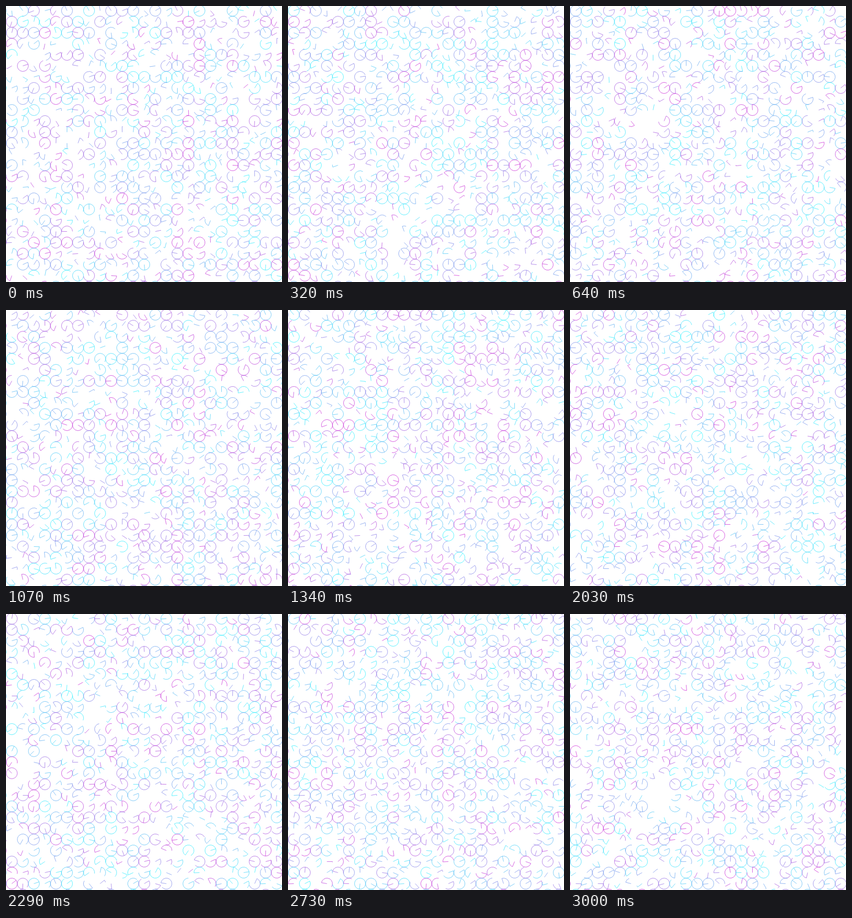
An HTML page with a canvas that plays this animation: 500x500 px, repeating every 3.1 s.

```html
<!DOCTYPE html>
<html lang="en">
<head>
<meta charset="utf-8">
<title>Random arcs</title>
<style>
html, body { margin: 0; width: 100%; height: 100%; overflow: hidden; background: #fff; }
canvas { display: block; width: 500px; height: 500px; }
</style>
</head>
<body>
<canvas id="stage" width="500" height="500"></canvas>
<script>
const ctx = document.getElementById('stage').getContext('2d');
const LOOP = 3100, CELL = 20, RADIUS = 10, TAU = Math.PI * 2;
const CYAN = [0, 240, 255], MAGENTA = [196, 0, 206];

// Runs of evenly spaced redraws: first time, last time, count
const RUNS = [
  [60, 550, 7], [640, 1160, 7], [1250, 1770, 7],
  [1850, 2290, 6], [2380, 2820, 6], [2910, 3000, 2]
];
const times = [0];
for (const [from, to, count] of RUNS) {
  for (let i = 0; i < count; i++) {
    times.push(Math.round((from + (to - from) * i / (count - 1)) / 10) * 10);
  }
}

function seeded(seed) {
  let s = seed | 0;
  return () => {
    s = (s + 0x6D2B79F5) | 0;
    let t = Math.imul(s ^ (s >>> 15), 1 | s);
    t = (t + Math.imul(t ^ (t >>> 7), 61 | t)) ^ t;
    return ((t ^ (t >>> 14)) >>> 0) / 4294967296;
  };
}

function mix(t) {
  const rgb = CYAN.map((c, i) => Math.round(c + (MAGENTA[i] - c) * t));
  return `rgb(${rgb})`;
}

// One spoke from the centre, then a clockwise arc
function drawArc(x, y, start, sweep, color) {
  ctx.strokeStyle = color;
  ctx.beginPath();
  ctx.moveTo(x, y);
  ctx.arc(x, y, RADIUS, start, start + sweep);
  ctx.stroke();
}

function drawField(step) {
  const rand = seeded(step * 7919 + 101);
  ctx.fillStyle = '#fff';
  ctx.fillRect(0, 0, 500, 500);
  ctx.lineWidth = 0.6;
  for (let col = -1; col <= 24; col++) {
    for (let row = 0; row <= 25; row++) {
      const kind = rand(), angle = rand(), tilt = rand(), part = rand(), tone = rand();
      if (kind < 0.08) continue;
      const start = tilt < 0.2 ? -0.45 + (angle - 0.5) * 0.5 : angle * TAU;
      const sweep = kind > 0.8 ? TAU : part ** 1.25 * TAU;
      drawArc(10.5 + col * CELL, 8.5 + row * CELL, start, sweep, mix(tone ** 1.15));
    }
  }
}

let shown = -1;
const origin = performance.now();

function tick() {
  const t = (performance.now() - origin) % LOOP;
  let step = times.length - 1;
  while (step > 0 && times[step] > t) step--;
  if (step !== shown) {
    drawField(step);
    shown = step;
  }
  requestAnimationFrame(tick);
}
tick();
</script>
</body>
</html>
```
